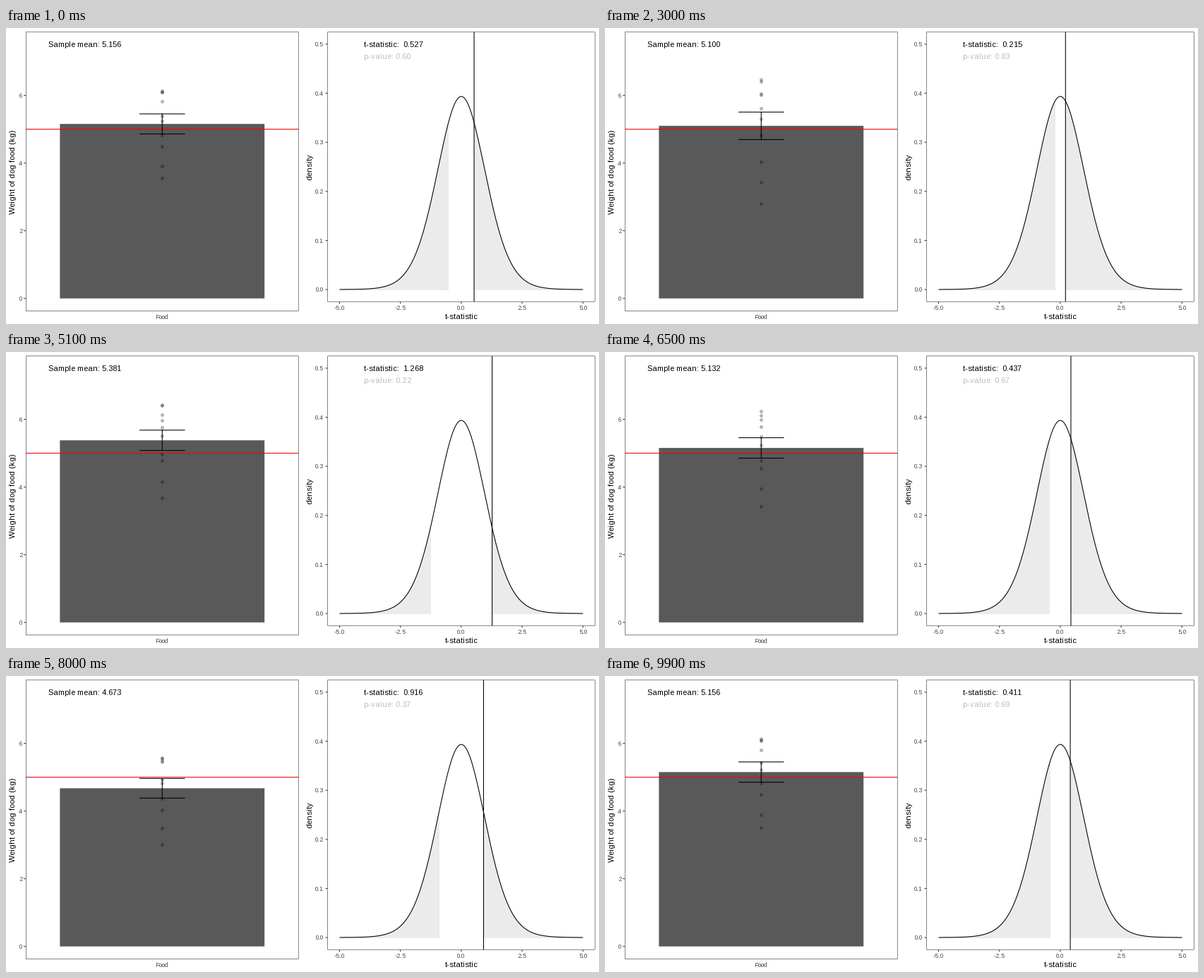
Recreate the animation shown at these times as a matplotlib script. Size 840 by 420 pixels, loop 10 s.

```python
import math

import numpy as np
import matplotlib.pyplot as plt
from matplotlib.animation import FuncAnimation
from matplotlib.patches import Polygon, Rectangle

plt.rcParams.update({
    "font.family": "Liberation Sans",
    "path.snap": False,
    "text.hinting": "force_autohint",
    "text.hinting_factor": 1,
})

W, H, DPI = 840, 420, 100
PX = 72 / DPI            # points per pixel
LINE = 1.07 * PX
FRAMES, INTERVAL = 100, 100
DF = 18
MU = 5
SIZE = 10                # weights in each sample

# Sample mean and t-statistic of each draw
SAMPLES = [(5.156, 0.527), (4.858, -0.480), (5.050, 0.215), (5.100, 0.246),
           (4.542, -1.470), (5.381, 1.268), (5.132, 0.437), (5.275, 0.916),
           (4.673, -1.125), (5.130, 0.411)]
MEANS, TSTATS = np.array(SAMPLES).T
ERRORS = (MEANS - MU) / TSTATS


def draw_weights(rng, mean, err):
    """Left-skewed weights with the given mean and standard error."""
    u = np.linspace(0, 1, SIZE)
    z = -0.65 * u - 2.4 * u ** 2 + rng.normal(0, 0.1, SIZE)
    z = (z - z.mean()) / z.std(ddof=1)
    return mean + z * err * math.sqrt(SIZE)


rng = np.random.default_rng(4)
POINTS = np.array([draw_weights(rng, m, e) for m, e in zip(MEANS, ERRORS)])

# Panels as left, top, right, bottom in pixels
BAR_PANEL = (28.05, 5.5, 414.5, 401.7)
T_PANEL = (455.3, 5.5, 834.5, 388.5)
BAR_X = (BAR_PANEL[0] + BAR_PANEL[2]) / 2
UNIT = (BAR_PANEL[2] - BAR_PANEL[0]) / 1.2


def kg_y(v):
    return 383.7 - 48.02 * np.asarray(v)


def t_x(t):
    return 644.9 + 34.47 * np.asarray(t)


def dens_y(d):
    return 371.1 - 696.4 * np.asarray(d)


def density(t):
    c = math.gamma((DF + 1) / 2) / (math.sqrt(DF * math.pi) * math.gamma(DF / 2))
    return c * (1 + np.asarray(t) ** 2 / DF) ** (-(DF + 1) / 2)


def p_value(t):
    mid = (np.arange(400) + 0.5) / 400 * abs(t)
    return 1 - 2 * abs(t) * density(mid).mean()


fig = plt.figure(figsize=(W / DPI, H / DPI), dpi=DPI, facecolor="white")
ax = fig.add_axes([0, 0, 1, 1])
ax.set_xlim(0, W)
ax.set_ylim(H, 0)
ax.axis("off")


def line(xs, ys, color="black", z=3):
    return ax.plot(xs, ys, color=color, lw=LINE, zorder=z,
                   solid_capstyle="butt", solid_joinstyle="round")[0]


def label(x, y, s, size=11, color="black", ha="left", rot=0):
    return ax.text(x, y, s, fontsize=size * PX, color=color, ha=ha,
                   va="baseline", rotation=rot, rotation_mode="anchor", zorder=8)


def frame_panel(box):
    # Only the inner half of the border shows
    x0, y0, x1, y1 = box
    inset = 0.27
    ax.add_patch(Rectangle((x0 + inset, y0 + inset),
                           x1 - x0 - 2 * inset, y1 - y0 - 2 * inset,
                           fill=False, ec="#333333", lw=0.6 * PX, zorder=7))


def y_tick(x, y, s):
    line([x - 2.74, x], [y, y], "#333333")
    label(x - 4.95, y + 3.15, s, 8.8, "#4D4D4D", "right")


def x_tick(x, y, s):
    line([x, x], [y, y + 2.74], "#333333")
    label(x, y + 11.5, s, 8.8, "#4D4D4D", "center")


# Bar panel
frame_panel(BAR_PANEL)
for v in (0, 2, 4, 6):
    y_tick(BAR_PANEL[0], kg_y(v), str(v))
label(BAR_X, 413, "Food", 8.8, "#4D4D4D", "center")
label(13, 203.6, "Weight of dog food (kg)", ha="center", rot=90)
bar = ax.add_patch(Rectangle((BAR_X - 0.45 * UNIT, kg_y(0)), 0.9 * UNIT, 0,
                             fc="#595959", lw=0, zorder=1, snap=True))
line([BAR_PANEL[0], BAR_PANEL[2]], [kg_y(MU)] * 2, "red", 2)
ink = (0, 0, 0, 0.25)
dots = ax.plot([BAR_X] * SIZE, [0] * SIZE, "o", ms=3.9 * PX, mfc=ink,
               mec=ink, mew=0.95 * PX, zorder=3)[0]
whisker = line([], [], z=4)
mean_text = label(60, 27, "")

# Distribution panel
frame_panel(T_PANEL)
for i in range(6):
    y_tick(T_PANEL[0], dens_y(i / 10), f"{i / 10:.1f}")
for v in (-5, -2.5, 0, 2.5, 5):
    x_tick(t_x(v), T_PANEL[3], f"{v:.1f}")
label(433, 197, "density", ha="center", rot=90)
label(644.9, 413, "t-statistic", ha="center")
tails = [ax.add_patch(Polygon([(0, 0)] * 3, fc="#EBEBEB", lw=0, zorder=1,
                              antialiased=False))
         for _ in range(2)]
grid = np.linspace(-5, 5, 401)
line(t_x(grid), dens_y(density(grid)))
t_line = line([], [], z=5)
t_text = label(507, 27, "")
p_text = label(507, 44, "", color="#BEBEBE")


def draw_bar(a, b, f):
    def mix(values):
        return values[a] + (values[b] - values[a]) * f

    mean, err = mix(MEANS), mix(ERRORS)
    top, low, high = kg_y(mean), kg_y(mean - err), kg_y(mean + err)
    bar.set_height(top - kg_y(0))
    dots.set_ydata(kg_y(mix(POINTS)))
    x0, x1 = BAR_X - 0.1 * UNIT, BAR_X + 0.1 * UNIT
    whisker.set_data([x0, x1, np.nan, BAR_X, BAR_X, np.nan, x0, x1],
                     [high, high, np.nan, high, low, np.nan, low, low])
    mean_text.set_text(f"Sample mean: {MEANS[b if f >= 0.5 else a]:.3f}")


def draw_test(t):
    span = np.linspace(abs(t), 5, 120)
    ys = dens_y(density(span))
    for side, tail in zip((-1, 1), tails):
        xs = t_x(side * span)
        tail.set_xy(np.column_stack([np.r_[xs[0], xs, xs[-1]],
                                     np.r_[dens_y(0), ys, dens_y(0)]]))
    t_line.set_data([t_x(t)] * 2, [T_PANEL[1], T_PANEL[3]])
    t_text.set_text(f"t-statistic: {t:6.3f}")
    p_text.set_text(f"p-value: {p_value(t):.2f}")


def update(n):
    k = max(n - 1, 0) // 10
    # The first move takes one step more than the others
    step = (n - 3) / 7 if k == 0 else (n - 10 * k - 4) / 6
    draw_bar(k, (k + 1) % len(SAMPLES), min(max(step, 0), 1))
    draw_test(TSTATS[k])
    return []


anim = FuncAnimation(fig, update, frames=FRAMES, interval=INTERVAL,
                     init_func=lambda: update(0), repeat=True, repeat_delay=0)
plt.show()
```
